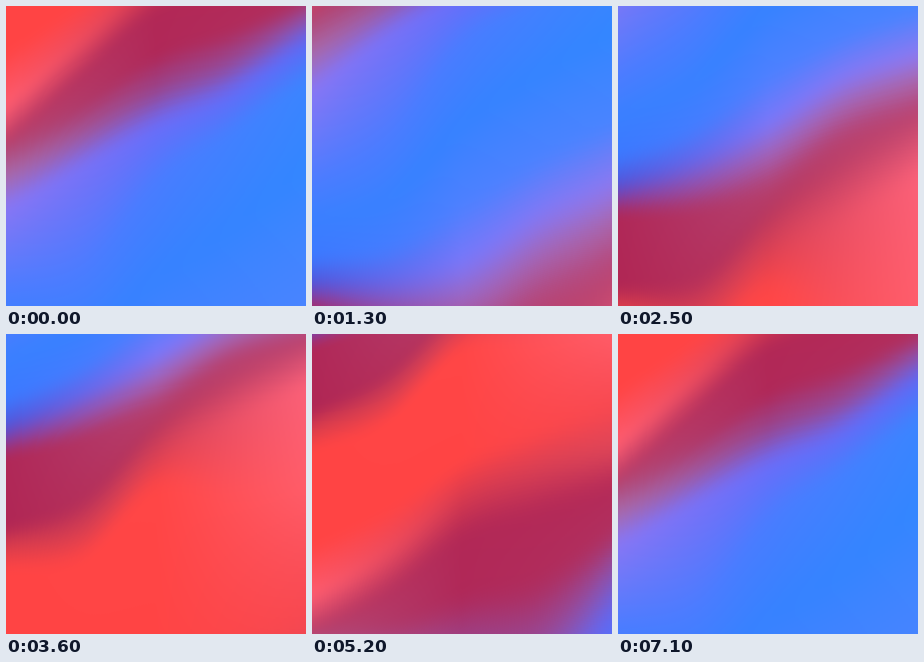
An HTML page with a canvas for the animation above (7200 ms loop, 300 by 300 pixels).

```html
<!DOCTYPE html>
<html>
<head>
<meta charset="utf-8">
<style>
  html, body { margin: 0; width: 100%; height: 100%; overflow: hidden; }
  canvas { display: block; width: 100vw; height: 100vh; }
</style>
</head>
<body>
<canvas id="stage" width="300" height="300"></canvas>
<script>
const SIZE = 300, PERIOD = 600, STEPS = 72, STEP_MS = 100, BLUR = 9;

// Each stop: height at x = 0, 75, 150, 225, 300, then colour at left, middle, right.
const stops = [
  [[645, 595, 545, 520, 500], 'ff4444 ff4444 f84850'],
  [[700, 635, 575, 548, 535], 'fc5c70 d83a4f dc4458'],
  [[735, 667, 605, 580, 562], 'bc3e68 b22856 b42a58'],
  [[747, 697, 648, 624, 592], 'b04c7c b02858 b03060'],
  [[770, 722, 680, 654, 612], 'a868a8 984690 9050a8'],
  [[803, 750, 708, 678, 634], '8876f4 6c6cf8 6068f4'],
  [[890, 840, 753, 711, 669], '4c7cff 4a7cff 3c84ff'],
  [[925, 890, 820, 775, 735], '3a80ff 3682ff 3386ff'],
  [[965, 932, 882, 842, 812], '3c78ff 4e80ff 4a84ff'],
  [[992, 959, 920, 879, 855], '5454d8 7c76f8 8e78f0'],
  [[1004, 977, 942, 900, 875], '8040a8 a064bc a868b0'],
  [[1022, 999, 967, 924, 900], 'b02858 b44070 b84474'],
  [[1095, 1057, 985, 942, 912], 'b02654 b83860 c44870'],
  [[1115, 1082, 1010, 977, 948], 'd83c4c d84055 fa6078'],
  [[1140, 1107, 1037, 1037, 1030], 'ff4444 ff4646 ff5c68']
].map(([heights, colors]) => ({
  heights,
  colors: colors.split(' ').map(c => [0, 2, 4].map(i => parseInt(c.substr(i, 2), 16)))
}));

const mix = (a, b, k) => a + (b - a) * k;
const mixColor = (a, b, k) => a.map((v, i) => mix(v, b[i], k));
const wrap = y => ((y % PERIOD) + PERIOD) % PERIOD;

// Catmull-Rom curve through evenly spaced values
function spline(p, u) {
  const i = Math.min(Math.floor(u), p.length - 2), k = u - i;
  const b = p[i], c = p[i + 1], a = p[i - 1] ?? 2 * b - c, d = p[i + 2] ?? 2 * c - b;
  return b + k / 2 * (c - a + k * (2 * a - 5 * b + 4 * c - d + k * (3 * (b - c) + d - a)));
}

function makeColumn(x) {
  const u = x / (SIZE - 1);
  const ramp = stops.map(({ heights, colors }) => ({
    y: spline(heights, u * 4),
    color: u < 0.5 ? mixColor(colors[0], colors[1], u * 2) : mixColor(colors[1], colors[2], u * 2 - 1)
  }));
  ramp.push({ y: ramp[0].y + PERIOD, color: ramp[0].color });
  const column = [];
  let i = 0;
  for (let y = Math.ceil(ramp[0].y), end = y + PERIOD; y < end; y++) {
    while (i < ramp.length - 2 && y > ramp[i + 1].y) i++;
    const a = ramp[i], b = ramp[i + 1];
    column[wrap(y)] = mixColor(a.color, b.color, (y - a.y) / (b.y - a.y));
  }
  return column;
}

function blurred(column, y, channel) {
  let sum = 0;
  for (let d = -BLUR; d <= BLUR; d++) sum += column[wrap(y + d)][channel];
  return sum / (2 * BLUR + 1);
}

const texture = new Uint8ClampedArray(SIZE * PERIOD * 3);
for (let x = 0; x < SIZE; x++) {
  const column = makeColumn(x);
  for (let y = 0; y < PERIOD; y++)
    for (let c = 0; c < 3; c++) texture[(y * SIZE + x) * 3 + c] = blurred(column, y, c);
}

// The lower right hangs down; the upper left sways once per loop.
const hang = Array.from({ length: SIZE }, (_, x) => 100 * Math.sin(Math.PI * x / SIZE / 2) - 8);

const ctx = document.getElementById('stage').getContext('2d');
const picture = ctx.createImageData(SIZE, SIZE);
picture.data.fill(255);

function draw(step) {
  const t = step / STEPS, out = picture.data;
  const sway = 26 * Math.sin(2 * Math.PI * t);
  for (let y = 0, o = 0; y < SIZE; y++) {
    const low = (y / SIZE) ** 2, high = (1 - y / SIZE) ** 2;
    for (let x = 0; x < SIZE; x++, o += 4) {
      const bend = low * hang[x] - high * sway * (1 - x / SIZE);
      const p = (wrap(Math.floor(y + PERIOD * t - bend)) * SIZE + x) * 3;
      out[o] = texture[p];
      out[o + 1] = texture[p + 1];
      out[o + 2] = texture[p + 2];
    }
  }
  ctx.putImageData(picture, 0, 0);
}

let start, shown = -1;
function tick(now) {
  start ??= now;
  const step = Math.floor(Math.max(0, now - start) / STEP_MS) % STEPS;
  if (step !== shown) draw(shown = step);
  requestAnimationFrame(tick);
}
requestAnimationFrame(tick);
</script>
</body>
</html>
```
